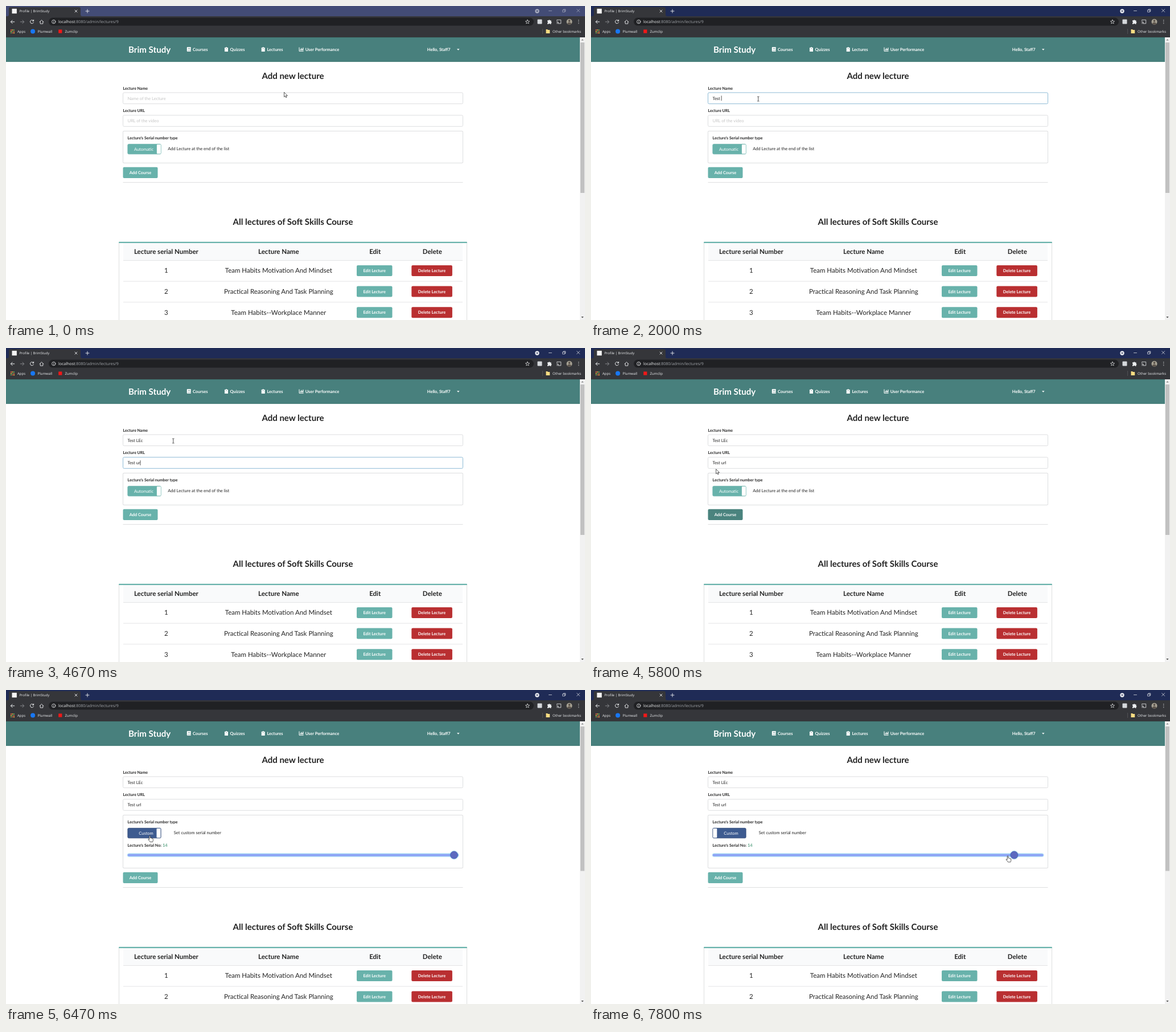
Animation of 1017x551 px, one loop 8000 ms. Source, as an HTML page:

```html
<!DOCTYPE html>
<html lang="en">
<head>
<meta charset="utf-8">
<title>Profile | BrimStudy</title>
<style>
  html, body { margin: 0; width: 100%; height: 100%; overflow: hidden; background: #fff; }
  svg { display: block; width: 100vw; height: 100vh; }
  text { font-family: Lato, sans-serif; font-size: 7.5px; fill: #222; white-space: pre; text-rendering: geometricPrecision; }
  .ui text { font-family: "Open Sans", "Noto Sans", sans-serif; font-size: 6.1px; fill: #eceef0; }
  .nav text { font-weight: 700; fill: #fff; font-size: 7.45px; }
  .mid { text-anchor: middle; }
  text.h { font-size: 15px; font-weight: 700; text-anchor: middle; }
  text.label { font-size: 7px; font-weight: 700; }
  text.head { font-size: 11.5px; font-weight: 700; text-anchor: middle; }
  text.cell { font-size: 11.5px; text-anchor: middle; }
  text.btn { font-size: 7.4px; font-weight: 700; fill: #fff; text-anchor: middle; }
  text.on { fill: #fff; text-anchor: middle; }
  .line { fill: none; stroke: #eceef0; stroke-linecap: round; stroke-linejoin: round; }
  .rule { stroke: #dedfe0; }
  .box { fill: #fff; stroke: #dddee0; }
  .shade { filter: drop-shadow(0 .6px .6px rgba(34, 36, 38, .2)); }
  .glow { filter: drop-shadow(.4px .6px 1.3px #58cfe8); }
</style>
</head>
<body>
<svg viewBox="0 0 1017 551" preserveAspectRatio="none">
  <defs>
    <g id="clip">
      <path d="M0 1.2h1.7a1.4 1.4 0 0 1 2.6 0H6V8.2H0Z" fill="#fff"/>
      <path d="M1.6 2.9h2.8" stroke="#48807d" stroke-width=".6"/>
    </g>
  </defs>
  <rect width="1017" height="551" fill="#fff"/>

  <g class="ui">
    <rect id="titlebar" width="1017" height="20"/>
    <path d="M2 18Q5 18 5 15V5Q5 2 8 2H128Q131 2 131 5V15Q131 18 134 18H1017V55H0V18Z" fill="#35363a"/>
    <rect x="10.5" y="4.8" width="8.4" height="8.4" fill="#f4f4f4"/>
    <text x="23.5" y="11.2" style="font-size:5.9px">Profile | BrimStudy</text>
    <path class="line" stroke-width=".9" d="M121 7l4 4m0-4l-4 4M140 9h6m-3-3v6"/>
    <g id="winbtns">
      <circle cx="933" cy="9" r="3.7" fill="#e4e6ec"/>
      <path d="M931.2 8.1h3.6L933 10.5Z" fill="#30385e"/>
      <path class="line" stroke-width=".7" d="M953.5 8.5h5M978 7h3.6v3.6H978ZM979.2 7V5.8h3.6v3.6h-1.2M1002.7 5.5l5 5m0-5l-5 5"/>
    </g>

    <g class="line">
      <path d="M14.8 27.8H8.5m2.7-2.8l-2.8 2.8 2.8 2.8"/>
      <path d="M25.3 27.8h6.3m-2.7-2.8l2.8 2.8-2.8 2.8" stroke="#85878b"/>
      <path d="M48 25.6a3.1 3.1 0 1 0 .5 3.2M48.6 24.3v2h-2"/>
      <path d="M59 28l3.5-3.4L66 28m-5.8-.5v3.6h4.6v-3.6" stroke-width=".9"/>
    </g>
    <rect x="75" y="20.6" width="852" height="14" rx="7" fill="#202124"/>
    <circle class="line" cx="83.8" cy="27.6" r="3.2" stroke-width=".8"/>
    <path class="line" d="M83.8 27.3v2M83.8 25.8v.1" stroke-width=".8"/>
    <text x="92" y="30.1" style="font-size:7.03px;fill:#a0a4a9"><tspan fill="#f1f3f4">localhost</tspan>:8080/admin/lectures/9</text>
    <path class="line" stroke-width=".7" d="M916 24.2l1 2.3 2.6.2-2 1.7.6 2.5-2.2-1.4-2.2 1.4.6-2.5-2-1.7 2.6-.2Z"/>
    <rect x="933.5" y="23.5" width="8" height="8" rx="1" fill="#d5d8dc"/>
    <path d="M951 25.2h2a1.3 1.3 0 0 1 2.5 0h2v2.2a1.3 1.3 0 0 1 0 2.5v1.9h-2a1.3 1.3 0 0 0-2.5 0h-2v-2a1.3 1.3 0 0 0 0-2.5Z" fill="#eceef0"/>
    <path class="line" stroke-width=".8" d="M967.7 26v-1.6h7v6.4h-3M967.7 30.8v.1M967.7 29a2 2 0 0 1 2 2M967.7 27.4a3.6 3.6 0 0 1 3.5 3.6"/>
    <circle cx="989.5" cy="27.7" r="5" fill="#a7a294"/>
    <path d="M985.8 31a3.8 3.3 0 0 1 7.4 0 5 5 0 0 1-7.4 0Z" fill="#5d554d"/>
    <circle cx="989.5" cy="26" r="1.9" fill="#5d554d"/>
    <path class="line" stroke-width="1.3" d="M1005.8 25v0M1005.8 27.8v0M1005.8 30.6v0"/>

    <g id="apps"></g>
    <text x="20" y="46.7">Apps</text>
    <circle cx="47.1" cy="44.5" r="4" fill="#1877f2"/>
    <text x="55.5" y="46.7">Plumwall</text>
    <rect x="92.2" y="41.4" width="6.2" height="6.2" fill="#f01818"/>
    <text x="103.5" y="46.7">Zumclip</text>
    <path d="M942.5 40v9" stroke="#5b5d61" stroke-width=".7"/>
    <path d="M948.5 41h2.5l1 1h3.2v6h-6.7Z" fill="#f8dc82"/>
    <text x="960" y="46.7">Other bookmarks</text>
  </g>

  <g class="nav">
    <rect y="55" width="1008" height="43" fill="#48807d"/>
    <path d="M0 55.4H1008M0 97.6H1008" stroke="#3f7672" stroke-width=".8"/>
    <text x="215" y="82" style="font-size:15.1px">Brim Study</text>
    <path d="M319 72h5.6v8H319a1.2 1.2 0 0 1-1.2-1.2v-5.6A1.2 1.2 0 0 1 319 72Z" fill="#fff"/>
    <path d="M319.8 74h3.4M319.8 75.4h3.4M319 78.4h5.4" stroke="#48807d" stroke-width=".6"/>
    <text x="328" y="79">Courses</text>
    <use href="#clip" x="384" y="71.8"/>
    <text x="393.5" y="79">Quizzes</text>
    <use href="#clip" x="448.7" y="71.8"/>
    <text x="458.4" y="79">Lectures</text>
    <path d="M515 72.5v6.8h7.6" fill="none" stroke="#fff"/>
    <path d="M517 78v-2.2M518.7 78v-4.2M520.3 78v-3M521.9 78v-5" stroke="#fff" stroke-width="1.1"/>
    <text x="525.7" y="79">User Performance</text>
    <text x="739.8" y="79">Hello, Staff7</text>
    <path d="M792 75.2h4.6l-2.3 2.5Z" fill="#fff"/>
  </g>

  <text class="h" x="504" y="127.8">Add new lecture</text>
  <text class="label" x="205.5" y="146.7">Lecture Name</text>
  <text class="label" x="205.5" y="186.4">Lecture URL</text>
  <g id="fields"></g>
  <rect id="panel" class="box shade" x="205.5" y="219.5" width="597" rx="2"/>
  <text class="label" x="213.5" y="234.2">Lecture's Serial number type</text>

  <rect id="toggle" x="213.9" y="242.4" width="58.2" height="17.4" rx="1.8" stroke-width=".9"/>
  <rect id="handle" y="242.9" width="7" height="16.4" rx="1.2" fill="#fff"/>
  <text id="mode" class="on" y="254.4"></text>
  <text id="hint" y="253.4"></text>

  <g id="slider">
    <text class="label" x="213.5" y="274.9">Lecture's Serial No:</text>
    <text x="275" y="274.9" style="fill:#2f8a63">14</text>
    <rect class="glow" x="213.6" y="287.4" width="581" height="4.6" rx="2" fill="#8fa6f6"/>
    <circle id="knob" class="glow" cy="289.6" r="6.5" fill="#5b6abf" stroke="#4656ae" stroke-width=".7"/>
  </g>

  <g id="lower">
    <rect id="add" x="205.5" y="282.8" width="61" height="19.2" rx="2"/>
    <text class="btn" x="236" y="295.1">Add Course</text>
    <path class="rule" d="M205.5 309.5h597"/>
    <text class="h" x="504" y="383.8">All lectures of Soft Skills Course</text>
    <path d="M198.5 415V560M809.5 415V560" class="rule"/>
    <rect x="206" y="416" width="596" height="30.5" fill="#f9fafb"/>
    <rect x="198" y="413.8" width="612" height="2.2" rx="1" fill="#68b2ab"/>
    <text class="head" x="281.4" y="434.9">Lecture serial Number</text>
    <text class="head" x="478.8" y="434.9">Lecture Name</text>
    <text class="head" x="648.2" y="434.9">Edit</text>
    <text class="head" x="748.8" y="434.9">Delete</text>
    <g id="rows"></g>
  </g>

  <rect x="1008" y="55" width="9" height="496" fill="#f1f1f1"/>
  <rect id="thumb" x="1009" y="64" width="7" fill="#c1c1c1"/>
  <path d="M1010.3 60.5l2.2-2.6 2.2 2.6Z" fill="#8a8a8a"/>
  <path d="M1010.3 545l2.2 2.6 2.2-2.6Z" fill="#505050"/>

  <g id="cursor">
    <path id="arrow" transform="scale(.52)" d="M0 0V16L3.7 12.6 6 18 8.6 17 6.3 11.6H11.4Z" fill="#fff" stroke="#111" stroke-width="1.3"/>
    <path id="beam" d="M-1.7-4H-.5L0-3.6.5-4H1.7M-1.7 4H-.5L0 3.6.5 4H1.7M0-3.6V3.6" fill="none" stroke="#222" stroke-width=".8"/>
    <path id="hand" transform="scale(.52)" d="M-1.6 13V1.6a1.6 1.6 0 0 1 3.2 0V7.4Q4.8 6.4 4.9 8.4 7.9 7.5 8 9.6 11 8.8 11 11.4V15.5Q11 18 9.4 21H.8Q-.8 18-5 13.6C-6 11.8-4.4 10.6-3.2 11.6Z" fill="#fff" stroke="#111" stroke-width="1.3" stroke-linejoin="round"/>
  </g>
</svg>
<script>
  const LOOP = 8000, TEAL = [104, 178, 171];
  const $ = id => document.getElementById(id);

  function add(parent, tag, attrs, text) {
    const el = document.createElementNS('http://www.w3.org/2000/svg', tag);
    set(el, attrs);
    if (text) el.textContent = text;
    return parent.appendChild(el);
  }
  function set(el, attrs) {
    for (const key in attrs) el.setAttribute(key, attrs[key]);
  }
  const show = (el, on) => el.style.display = on ? '' : 'none';
  const ramp = (t, from, to) => Math.min(1, Math.max(0, (t - from) / (to - from)));
  const mix = (a, b, k) => `rgb(${a.map((v, i) => Math.round(v + (b[i] - v) * k))})`;
  const within = (t, spans) => spans.some(([from, to]) => t >= from && t < to);
  const latest = (steps, t) => steps.filter(s => s[0] <= t).pop();

  const dotColors = ['#e8554a', '#f0b93b', '#4fae63'];
  for (let i = 0; i < 9; i++) {
    add($('apps'), 'rect', { x: 8 + i % 3 * 2.6, y: 41.2 + Math.floor(i / 3) * 2.6, width: 1.8, height: 1.8, fill: dotColors[(i + Math.floor(i / 3)) % 3] });
  }

  const lectures = ['Team Habits Motivation And Mindset', 'Practical Reasoning And Task Planning', 'Team Habits--Workplace Manner'];
  lectures.forEach((name, i) => {
    const g = add($('rows'), 'g', { transform: `translate(0 ${i * 36.6})` });
    add(g, 'path', { class: 'rule', d: 'M206 446.5H802', 'stroke-width': .8 });
    add(g, 'text', { class: 'cell', x: 281.4, y: 468.4 }, String(i + 1));
    add(g, 'text', { class: 'cell', x: 478.8, y: 468.4 }, name);
    add(g, 'rect', { x: 616, y: 455, width: 62.5, height: 19, rx: 2, fill: '#68b2ab' });
    add(g, 'text', { class: 'btn', x: 647.2, y: 467.2 }, 'Edit Lecture');
    add(g, 'rect', { x: 712.3, y: 455, width: 71.6, height: 19, rx: 2, fill: '#b92f31' });
    add(g, 'text', { class: 'btn', x: 748, y: 467.2 }, 'Delete Lecture');
  });

  // keys: time at which each typed character appears
  const fields = [
    { y: 152, hint: 'Name of the Lecture', text: 'Test LEc', focus: [670, 2870],
      keys: [1330, 1530, 1670, 1930, 2000, 2330, 2400, 2600], caretOn: [[730, 1200], [1330, 2870]] },
    { y: 191.7, hint: 'URL of the video', text: 'Test url', focus: [2870, 5270],
      keys: [3530, 3800, 3930, 4130, 4200, 4530, 4670, 4870], caretOn: [[2930, 3400], [3530, 5270]] }
  ];
  for (const f of fields) {
    f.box = add($('fields'), 'rect', { class: 'box', x: 205.5, y: f.y, width: 597, height: 19.6, rx: 2 });
    f.label = add($('fields'), 'text', { x: 213.4, y: f.y + 12.5 });
    f.caret = add($('fields'), 'rect', { y: f.y + 5.4, width: .7, height: 8.8, fill: '#111' });
  }

  // time, x, y, shape
  const moves = [
    [0, 488.5, 151.3, 'arrow'], [70, 481, 156, 'arrow'], [130, 450, 173.5, 'arrow'],
    [200, 412, 171, 'beam'], [270, 366, 168, 'beam'], [330, 333, 166, 'beam'],
    [400, 311, 164, 'beam'], [470, 298, 163, 'beam'], [530, 293.8, 163, 'beam'],
    [5600, 288, 168, 'beam'], [5670, 261, 184, 'arrow'], [5730, 232, 202, 'beam'],
    [5800, 219.6, 212.5, 'arrow'], [5870, 217.8, 222, 'arrow'], [5930, 219, 230, 'arrow'],
    [6070, 223, 234, 'arrow'], [6130, 232, 243, 'hand'], [6200, 241, 249, 'hand'],
    [6270, 248, 254, 'hand'], [6330, 252.6, 255.7, 'hand'], [6600, 305, 258, 'arrow'],
    [6670, 480, 262, 'arrow'], [6730, 670, 262, 'arrow'], [6800, 778.4, 259.5, 'arrow'],
    [7000, 775, 271, 'arrow'], [7070, 772, 283.2, 'hand'], [7330, 771.3, 290.8, 'hand'],
    [7670, 766, 291, 'hand'], [7730, 748, 291, 'hand'], [7800, 732, 291, 'hand']
  ];

  function drawField(f, t) {
    const typed = f.text.slice(0, f.keys.filter(k => k <= t).length);
    const glow = ramp(t, f.focus[0], f.focus[0] + 60) * (1 - ramp(t, f.focus[1], f.focus[1] + 60));
    f.box.style.stroke = mix([221, 222, 224], [142, 187, 214], glow);
    f.label.textContent = typed || f.hint;
    f.label.style.fill = typed ? '#222' : mix([196, 196, 196], [138, 138, 138], glow);
    const width = typed ? f.label.getComputedTextLength() : 0;
    f.caret.setAttribute('x', 213.4 + width);
    show(f.caret, within(t, f.caretOn));
  }

  function drawToggle(t, custom) {
    const slide = ramp(t, 6470, 6600);
    const fill = custom ? 'rgb(61,91,144)' : mix(TEAL, [77, 134, 65], ramp(t, 6130, 6330));
    const edge = custom ? '#2f4877' : t >= 6330 ? '#234d1f' : fill;
    set($('toggle'), { fill, stroke: edge });
    set($('handle'), { x: 264.9 - slide * 50.6 });
    $('mode').textContent = custom ? 'Custom' : 'Automatic';
    set($('mode'), { x: custom ? 246 : 242 });
    $('hint').textContent = custom ? 'Set custom serial number' : 'Add Lecture at the end of the list';
    set($('hint'), { x: custom ? 294.8 : 284.3 });
  }

  function draw(t) {
    const active = t >= 670, custom = t >= 6470;
    set($('titlebar'), { fill: active ? '#1f2b56' : '#434c76' });
    set($('winbtns'), { opacity: active ? 1 : .6 });
    fields.forEach(f => drawField(f, t));
    drawToggle(t, custom);

    set($('panel'), { height: custom ? 93 : 56 });
    set($('lower'), { transform: `translate(0 ${custom ? 37 : 0})` });
    set($('thumb'), { height: custom ? 253.5 : 264 });
    show($('slider'), custom);
    set($('knob'), { cx: t < 7730 ? 787 : 743.3 });
    const pressed = ramp(t, 5270, 5400) * (1 - ramp(t, 6330, 6400));
    set($('add'), { fill: mix(TEAL, [74, 131, 126], pressed) });

    const [, x, y, shape] = latest(moves, t);
    set($('cursor'), { transform: `translate(${x} ${y})` });
    for (const id of ['arrow', 'beam', 'hand']) show($(id), id === shape);
  }

  const start = performance.now();
  function tick() {
    draw((performance.now() - start) % LOOP);
    requestAnimationFrame(tick);
  }
  tick();
</script>
</body>
</html>
```
